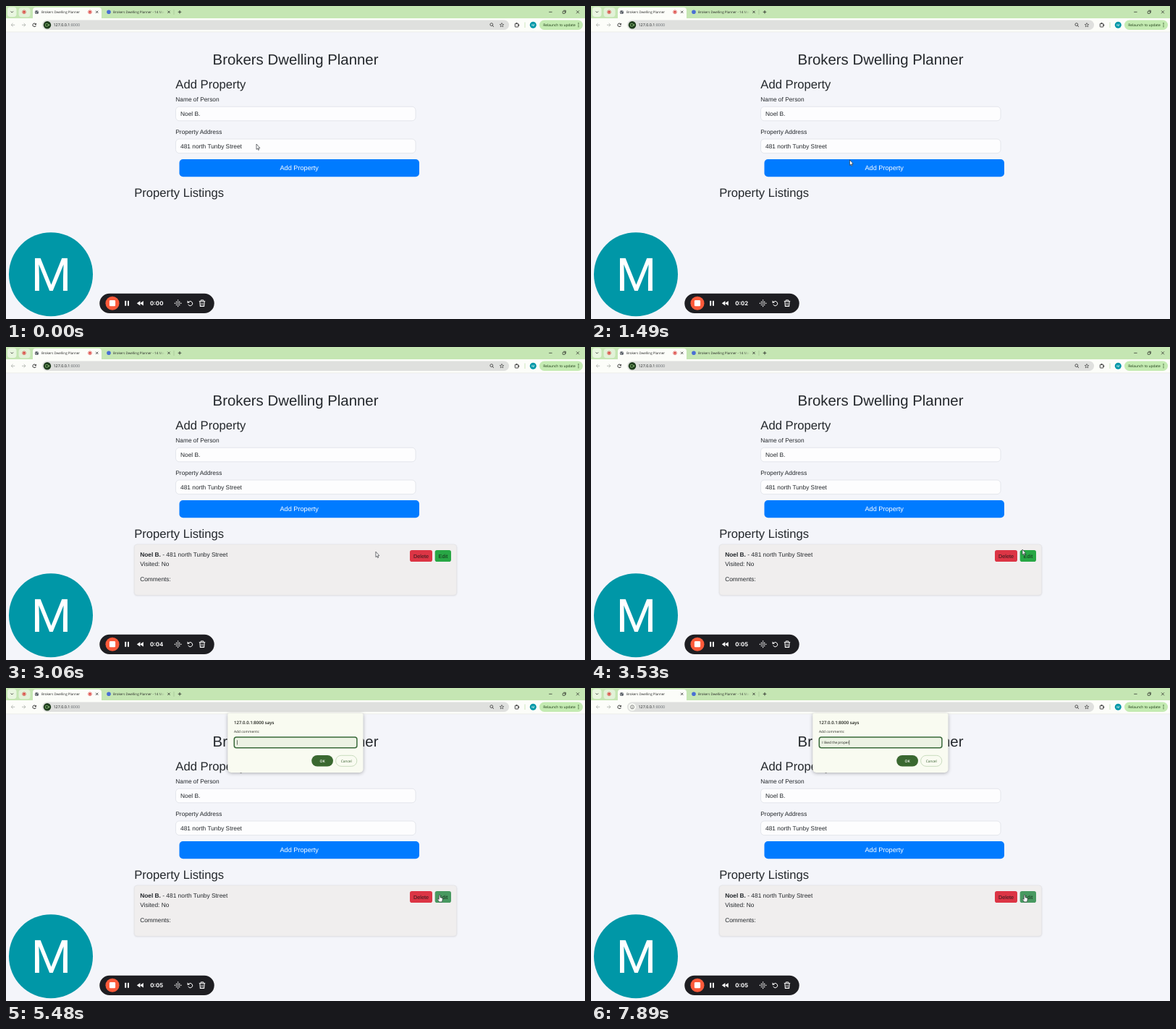
An HTML page with a canvas that plays this animation: 800x433 px, repeating every 7990 ms.

```html
<!DOCTYPE html>
<html lang="en">
<head>
<meta charset="utf-8">
<title>Property list demo</title>
<style>
html, body { margin: 0; width: 100%; height: 100%; overflow: hidden; background: #f4f5fa; }
canvas { display: block; width: 800px; height: 433px; }
</style>
</head>
<body>
<canvas id="stage"></canvas>
<script>
const LOOP = 7990, TICK = 92.9;
const PAGE = '"Liberation Sans", Arial, sans-serif';
const UI = '"Open Sans", "Noto Sans", sans-serif';
const APP = 'Brokers Dwelling Planner';
const PERSON = 'Noel B.';
const ADDRESS = '481 north Tunby Street';
const INK = '#24282c';

const canvas = document.getElementById('stage');
const ctx = canvas.getContext('2d');
const ratio = window.devicePixelRatio || 1;
canvas.width = 800 * ratio;
canvas.height = 433 * ratio;
ctx.scale(ratio, ratio);
ctx.textRendering = 'geometricPrecision';

const ramp = (t, a, b) => Math.min(1, Math.max(0, (t - a) / (b - a)));
const mix = (a, b, k) => `rgb(${a.map((v, i) => Math.round(v + (b[i] - v) * k))})`;

function text(s, x, y, size, color = INK, family = PAGE, weight = 400, align = 'left') {
  ctx.font = `${weight} ${size}px ${family}`;
  ctx.fillStyle = color;
  ctx.textAlign = align;
  ctx.fillText(s, x, y);
  return ctx.measureText(s).width;
}

function box(x, y, w, h, r, fill, stroke, width = 1) {
  ctx.beginPath();
  ctx.roundRect(x, y, w, h, r);
  if (fill) { ctx.fillStyle = fill; ctx.fill(); }
  if (stroke) { ctx.strokeStyle = stroke; ctx.lineWidth = width; ctx.stroke(); }
}

function disc(x, y, r, fill, stroke, width = 1) {
  box(x - r, y - r, 2 * r, 2 * r, r, fill, stroke, width);
}

function line(points, color, width = 0.8) {
  ctx.beginPath();
  points.forEach(([x, y], i) => i ? ctx.lineTo(x, y) : ctx.moveTo(x, y));
  ctx.strokeStyle = color;
  ctx.lineWidth = width;
  ctx.stroke();
}

function poly(points, fill, stroke, width = 0.7) {
  ctx.beginPath();
  points.forEach(([x, y]) => ctx.lineTo(x, y));
  ctx.closePath();
  ctx.fillStyle = fill;
  ctx.fill();
  if (stroke) { ctx.strokeStyle = stroke; ctx.lineWidth = width; ctx.stroke(); }
}

function arc(x, y, r, from, to, color, width = 0.9) {
  ctx.beginPath();
  ctx.arc(x, y, r, from, to);
  ctx.strokeStyle = color;
  ctx.lineWidth = width;
  ctx.stroke();
}

function shadow(color, blur, dy) {
  ctx.shadowColor = color;
  ctx.shadowBlur = blur * ratio;
  ctx.shadowOffsetY = dy * ratio;
}

function cross(x, y, r, color = '#222', width = 0.8) {
  line([[x - r, y - r], [x + r, y + r]], color, width);
  line([[x - r, y + r], [x + r, y - r]], color, width);
}

function recordDot(x, y) {
  disc(x, y, 2.4, null, '#d93a36', 0.7);
  disc(x, y, 1.4, '#d92f2b');
}

function tabs(recording) {
  ctx.fillStyle = '#c5e6b3';
  ctx.fillRect(0, 0, 800, 18);
  box(2, 1.5, 12.5, 13.5, 4, '#e9f6e0');
  line([[6.6, 7.4], [8.3, 9.1], [10, 7.4]], '#222');
  box(17.5, 2.2, 16, 13, 4, '#e2f2d8');
  recordDot(25, 8.3);

  box(37, 2, 95, 18, [4, 4, 0, 0], '#fcfdf9');
  disc(42.5, 8.5, 2.6, '#555b62');
  line([[40.2, 8], [42, 9], [42.4, 10.8]], '#fff', 0.6);
  line([[42.8, 6.2], [43.4, 7.6], [44.8, 8]], '#fff', 0.6);
  text(APP, 49, 10.3, 4.55, '#222', UI);
  if (recording) recordDot(116, 8.3);
  cross(125.7, 8.3, 1.6);

  disc(142, 8.3, 2.8, '#4a6fd4');
  const fade = ctx.createLinearGradient(209, 0, 219, 0);
  fade.addColorStop(0, '#222');
  fade.addColorStop(1, 'rgba(34,34,34,0)');
  ctx.save();
  ctx.beginPath();
  ctx.rect(148, 0, 71, 17);
  ctx.clip();
  text(APP + ' - 14 Mar', 148, 10.3, 4.55, fade, UI);
  ctx.restore();
  cross(225, 8.3, 1.6);
  line([[232, 5], [232, 12]], '#9dbd8d', 0.6);
  line([[237.7, 8.3], [242.3, 8.3]], '#222');
  line([[240, 6], [240, 10.6]], '#222');

  line([[750.2, 8.3], [754.6, 8.3]], '#222', 0.7);
  box(769.2, 7.2, 3.2, 3.2, 0.5, null, '#222', 0.7);
  line([[770.3, 6.2], [773.4, 6.2], [773.4, 9.4]], '#222', 0.7);
  cross(790, 8.3, 2, '#222', 0.7);
}

function navArrow(x, dir, color) {
  line([[x - 2.5, 26.2], [x + 2.5, 26.2]], color);
  line([[x + dir * 0.2, 23.9], [x + dir * 2.5, 26.2], [x + dir * 0.2, 28.5]], color);
}

function toolbar(recording) {
  ctx.fillStyle = '#fcfdf9';
  ctx.fillRect(0, 17, 800, 19);
  ctx.fillStyle = '#e3e7e0';
  ctx.fillRect(0, 35.6, 800, 0.6);
  navArrow(9.7, -1, '#a9aca7');
  navArrow(24.5, 1, '#a9aca7');
  arc(39.2, 26.3, 2.3, 0.3, 5.4, '#222', 0.9);
  poly([[41.8, 23.4], [41.8, 25.9], [39.4, 25.9]], '#222');

  box(50, 19.6, 645, 13.4, 6.7, '#dfe0de');
  if (recording) {
    disc(57, 26.3, 5.2, '#1f3d1d');
    box(54.4, 24.6, 3.9, 3.4, 0.8, null, '#a5dc8d', 0.7);
    poly([[58.6, 26.3], [60, 25], [60, 27.6]], '#a5dc8d');
  } else {
    disc(57, 26.3, 5.2, '#f6f8f3');
    disc(57, 26.3, 2.5, null, '#444', 0.6);
    line([[57, 26], [57, 27.8]], '#444', 0.6);
    line([[57, 24.8], [57, 25.4]], '#444', 0.6);
  }
  const w = text('127.0.0.1', 65.5, 28.2, 5.4, '#16191b', UI);
  text(':8000', 65.5 + w, 28.2, 5.4, '#666b6f', UI);

  disc(670.8, 25.6, 1.9, null, '#333', 0.8);
  line([[672.2, 27], [674, 28.8]], '#333', 0.9);
  const star = Array.from({ length: 10 }, (_, i) => {
    const a = i * Math.PI / 5 - Math.PI / 2, r = i % 2 ? 1.3 : 3;
    return [685 + r * Math.cos(a), 26.4 + r * Math.sin(a)];
  });
  poly(star, '#dfe0de', '#333', 0.6);

  box(703.3, 24.2, 4.6, 4.8, 0.6, null, '#333', 0.9);
  disc(705.5, 23.9, 0.9, '#333');
  disc(708.4, 26.5, 0.9, '#333');
  line([[717, 22.5], [717, 30]], '#b9dda8', 0.7);
  disc(728.3, 26.3, 4.5, '#0097a7');
  text('M', 728.3, 28, 4.7, '#fff', 'Roboto, sans-serif', 400, 'center');
  box(737, 19.6, 60, 13.4, 6.7, '#c4ebb2');
  text('Relaunch to update', 742.3, 28.1, 4.9, '#17330f', UI);
  for (const y of [24, 26.3, 28.6]) disc(791, y, 0.65, '#17330f');
}

function field(label, value, y) {
  text(label, 234.3, y - 7.2, 8.35);
  box(234.5, y, 331.5, 19.6, 5, '#fdfdfe', '#dfe1e7', 0.8);
  text(value, 241, y + 13, 8.35);
}

function card(t) {
  ctx.save();
  ctx.globalAlpha = ramp(t, 1940, 2130);
  const hover = ramp(t, 2700, 2960);
  shadow('rgba(0,0,0,.12)', 2.5, 0.8);
  box(177.3, 273, 445.4, 70.3, 4, mix([254, 254, 255], [240, 238, 238], hover));
  shadow('transparent', 0, 0);
  box(177.3, 273, 445.4, 70.3, 4, null, '#e1e1e5', 0.6);
  const w = text(PERSON, 185.2, 290.2, 8.35, INK, PAGE, 700);
  text(' - ' + ADDRESS, 185.2 + w, 290.2, 8.35);
  text('Visited: No', 185.2, 302.6, 8.35);
  text('Comments:', 185.2, 323.5, 8.35);
  box(558, 281, 31, 16, 2.8, '#dc3545');
  text('Delete', 573.5, 291.8, 7.3, '#30181c', PAGE, 400, 'center');
  box(592.7, 281, 22.3, 16, 2.8, mix([40, 167, 69], [72, 153, 96], ramp(t, 3530, 3710)));
  text('Edit', 603.9, 291.8, 7.3, '#14301c', PAGE, 400, 'center');
  ctx.restore();
}

function page(t) {
  ctx.fillStyle = '#f4f5fa';
  ctx.fillRect(0, 36, 800, 397);
  text(APP, 400, 80.7, 20.4, INK, PAGE, 400, 'center');
  text('Add Property', 234.3, 114.4, 16.65);
  field('Name of Person', PERSON, 139.2);
  field('Property Address', ADDRESS, 184);
  const hover = ramp(t, 1490, 1670) - ramp(t, 2600, 2790);
  box(239.5, 212, 331.5, 24.2, 5, mix([0, 123, 255], [0, 84, 178], hover));
  text('Add Property', 405.2, 227.4, 9.17, '#fff', PAGE, 400, 'center');
  text('Property Listings', 177.2, 264.4, 16.65);
  if (t >= 2035) card(t);
}

function badge() {
  disc(62, 371.2, 58, '#0097a7');
  text('M', 62.4, 394, 63.5, '#fff', 'Roboto, sans-serif', 400, 'center');
}

function recorder(t) {
  const seconds = [650, 1390, 2040, 2790, 3440].filter(s => t >= s - 4).length;
  box(129.3, 397.8, 158.4, 27.2, 13.6, '#1e1e22');
  disc(147, 411.2, 9.5, '#fb5a3a');
  box(142.9, 407.1, 8.2, 8.2, 1.4, '#fff');
  box(164.2, 407.8, 2, 7, 0.5, '#fff');
  box(168, 407.8, 2, 7, 0.5, '#fff');
  for (const x of [180.8, 185.2]) poly([[x, 411.3], [x + 4.6, 408], [x + 4.6, 414.6]], '#fff');
  text('0:0' + seconds, 208.2, 414.1, 7.8, '#fff', 'Inter, sans-serif', 700, 'center');

  for (let i = -2; i <= 2; i++)
    for (let j = -2; j <= 2; j++)
      if (Math.abs(i) + Math.abs(j) < 3) disc(237.6 + i * 2.1, 411.3 + j * 2.1, 0.75, '#fff');
  arc(254.6, 411.6, 3.1, -2.2, 2.8, '#fff', 1);
  poly([[250.6, 407.5], [250.6, 411], [254, 410.2]], '#fff');
  line([[266.8, 408.4], [275.2, 408.4]], '#fff', 1);
  line([[269.3, 408], [269.3, 406.8], [272.7, 406.8], [272.7, 408]], '#fff', 0.9);
  line([[267.9, 408.6], [268.4, 415.4], [273.6, 415.4], [274.1, 408.6]], '#fff', 1.1);
  line([[270.1, 410.3], [270.1, 413.7]], '#fff', 0.7);
  line([[271.9, 410.3], [271.9, 413.7]], '#fff', 0.7);
}

function dialog(prompt, value, caret) {
  shadow('rgba(0,0,0,.3)', 5, 1);
  box(306.3, 35, 187.2, 82, [2, 2, 5, 5], '#f9fbf1');
  shadow('transparent', 0, 0);
  text('127.0.0.1:8000 says', 315, 50.2, 6.05, '#1b1d18', UI, 600);
  text(prompt, 315, 62.4, 4.85, '#2b2e28', UI);
  box(315.3, 68, 169.6, 14.8, 3, '#ecf2e4', '#38693a', 1.5);
  const w = text(value, 319, 77.2, 4.7, '#1b1d18', UI);
  if (caret) line([[319.5 + w, 72.2], [319.5 + w, 78.6]], '#1b1d18', 0.6);
  box(422.2, 93, 29.8, 15.6, 7.8, '#3a6830');
  text('OK', 437.1, 102.7, 5.1, '#fff', UI, 600, 'center');
  box(455.6, 93.3, 29.2, 15, 7.5, null, '#bdd5b1', 0.8);
  text('Cancel', 470.2, 102.6, 4.9, '#335d2a', UI, 400, 'center');
}

// One character per tick, with two pauses near the end.
function comment(t) {
  const n = t < 7300 ? Math.floor((t - 5936) / TICK) + 1
    : 15 + [7425, 7515, 7885].filter(s => t >= s).length;
  return 'I liked the proper'.slice(0, Math.max(0, n));
}

function prompts(t) {
  if (t >= 3895 && t < 5286) {
    dialog('Mark as visited? (yes/no)', t < 4546 ? '' : t < 4636 ? 'ye' : 'yes', t < 5006);
  } else if (t >= 5380) {
    dialog('Add comments:', comment(t), t < 5756 || t >= 5936);
  }
}

const PATH = [
  [0, 346, 191], [560, 345, 190], [930, 339, 184], [1110, 330, 182.5], [1210, 328, 182.5],
  [1390, 344, 197], [1490, 358, 213.5], [1670, 362, 225], [2600, 362, 225], [2690, 383, 240],
  [2880, 480, 276], [3060, 540, 290], [3340, 588, 286], [3530, 596, 280], [3720, 599, 286.5],
  [LOOP, 599, 286.5]
];

function pointer(t) {
  const q = Math.floor((t + 4) / TICK) * TICK;
  const i = PATH.findIndex(p => p[0] > q);
  const [t0, x0, y0] = PATH[Math.max(i, 1) - 1], [t1, x1, y1] = PATH[Math.max(i, 1)];
  const k = ramp(q, t0, t1);
  const x = i < 0 ? 599 : x0 + (x1 - x0) * k, y = i < 0 ? 286.5 : y0 + (y1 - y0) * k;
  const hand = (t >= 1575 && t < 2686) || t >= 3615;
  const shape = hand
    ? [[-.8, .2], [0, -.6], [.9, .2], [1, 3.2], [3.8, 4], [4.3, 5], [3.8, 8], [3.2, 9.4], [-.4, 9.4], [-2.8, 6], [-2.4, 5], [-.8, 6]]
    : [[0, 0], [0, 7.4], [1.6, 6], [2.6, 8.4], [3.7, 7.9], [2.7, 5.6], [4.8, 5.4]];
  poly(shape.map(([a, b]) => [x + a, y + b]), '#fff', '#33363c', 0.7);
}

function draw(now) {
  const t = now % LOOP;
  const recording = t < 6316;
  page(t);
  tabs(recording);
  toolbar(recording);
  prompts(t);
  badge();
  recorder(t);
  pointer(t);
  requestAnimationFrame(draw);
}
requestAnimationFrame(draw);
</script>
</body>
</html>
```
